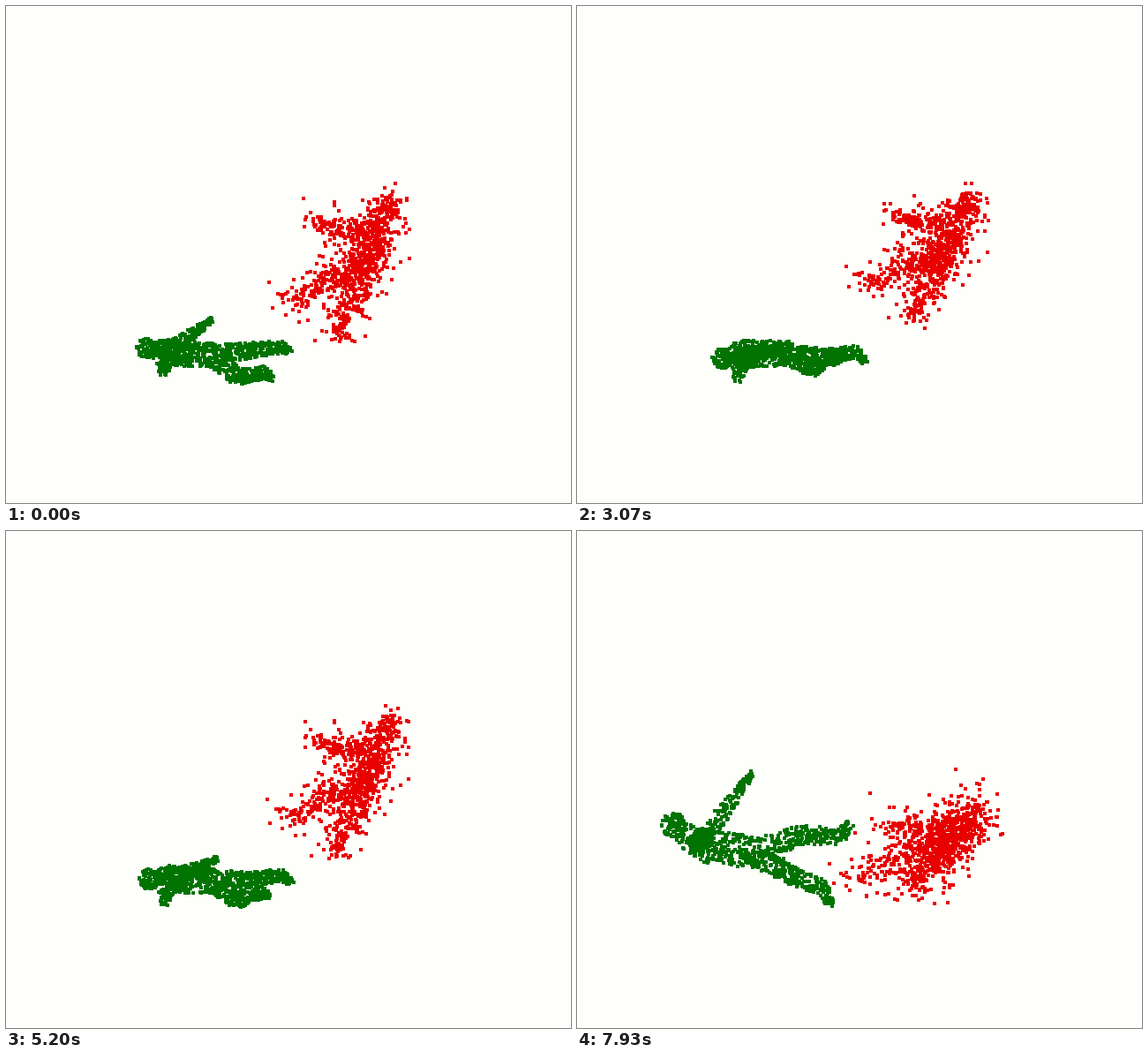
A matplotlib script for the animation above (8000 ms loop, 640 by 563 pixels).

```python
import numpy as np
import matplotlib.pyplot as plt
from matplotlib.animation import FuncAnimation

W, H, DPI = 640, 563, 64
LOOP, STEP = 8000, 40
TICK = 1000 / 15
PAPER, GREEN, RED = "#fefefb", "#007300", "#e80000"
PIVOT = np.array([300, 347])

# Spells in which the view turns; the picture rests in between.
SPELLS = [(0, 70), (270, 1130), (1270, 1400), (1730, 2730), (2930, 3200),
          (3400, 3730), (3870, 5800), (6070, 6270), (6600, 7400), (7470, 7930)]
UPDATES = np.concatenate([np.linspace(a, b, round((b - a) / TICK) + 1) for a, b in SPELLS])

# Orbiting camera: time, tilt, yaw (degrees), zoom, sideways pan
VIEW = np.array([
    (0, 30, 3, 1, 8), (500, 36, 3, 1, 6), (1270, 0, 0, 1, 0), (2300, 48, 3, 1, 6),
    (3070, 60, 5, 1, 14), (4000, 105, 5, 1, 16), (4600, 90, 5, 1, 16),
    (5800, -3, 10, 1, 1), (6270, -3, 11, 1.22, -5), (7330, -32, 13, 1.23, -5),
    (7930, -32, 0, 1.23, -5)])

# Joints in space around the pivot
WALKER = dict(
    head=(-151, 18, 50), chest=(-127, 31, 37), hip=(-76, 37, 32),
    hand1=(-78, -29, 66), hand2=(-132, 42, 63),
    knee1=(-35, 25, 44), foot1=(2, 23, 38), toe1=(12, 19, 55),
    knee2=(-46, 63, 38), foot2=(-14, 67, 20), toe2=(-7, 80, 12))
GHOST = dict(
    head=(125, -83, -93), chest=(112, -59, -77), hip=(101, -29, -57),
    hand1=(44, -66, -89), knee1=(60, -12, -56), foot1=(13, 14, -45),
    knee2=(90, 1, -41), foot2=(68, 43, -17))

# Bones: two joints, the radius at each, number of points
BONES = [("head", "head", 11, 11, 70), ("head", "chest", 6, 14, 60),
         ("chest", "hip", 16, 14, 220), ("chest", "hand1", 10, 3, 150),
         ("chest", "hand2", 13, 5, 90)]
for side in "12":
    BONES += [("hip", "knee" + side, 12, 9, 110), ("knee" + side, "foot" + side, 9, 7, 110),
              ("foot" + side, "toe" + side, 6, 4, 40)]


def cloud(joints, seed, spread=0):
    """Scatter points over the surface of a body, with optional noise."""
    rng = np.random.default_rng(seed)
    parts = []
    for start, end, r0, r1, n in BONES:
        if start not in joints or end not in joints:
            continue
        a, b = np.array(joints[start]), np.array(joints[end])
        u = rng.random((n, 1))
        out = rng.normal(size=(n, 3))
        out /= np.linalg.norm(out, axis=1, keepdims=True)
        parts.append(a + (b - a) * u + out * (r0 + (r1 - r0) * u))
    points = np.concatenate(parts)
    sigma = spread * np.where(rng.random((len(points), 1)) < 0.5, 1, 0.3)
    return points + sigma * rng.normal(size=points.shape)


def camera(t):
    keys = VIEW[:, 0]
    i = np.clip(np.searchsorted(keys, t, "right") - 1, 0, len(keys) - 2)
    s = (t - keys[i]) / (keys[i + 1] - keys[i])
    ease = s * s * (3 - 2 * s)
    return (VIEW[i] + (VIEW[i + 1] - VIEW[i]) * ease)[1:]


def project(points, tilt, yaw, zoom, pan):
    x, y, z = points.T
    tilt, yaw = np.radians((tilt, yaw))
    depth = z * np.cos(tilt) - y * np.sin(tilt)
    y = y * np.cos(tilt) + z * np.sin(tilt)
    x = x * np.cos(yaw) + depth * np.sin(yaw)
    return np.round((PIVOT[0] + pan + zoom * x, PIVOT[1] + zoom * y))


fig = plt.figure(figsize=(W / DPI, H / DPI), dpi=DPI, facecolor=PAPER)
ax = fig.add_axes((0, 0, 1, 1))
ax.set(xlim=(0, W), ylim=(H, 0))
ax.axis("off")


def dots(color):
    return ax.plot([], [], "s", ms=4 * 72 / DPI, mew=0, color=color, antialiased=False)[0]


layers = [(cloud(GHOST, seed=11, spread=12), dots(RED)),
          (cloud(WALKER, seed=4), dots(GREEN))]


def draw(i):
    now = (i + 1) * STEP - 1
    view = camera(UPDATES[UPDATES <= now][-1])
    for points, line in layers:
        line.set_data(*project(points, *view))
    return [line for _, line in layers]


anim = FuncAnimation(fig, draw, frames=LOOP // STEP, interval=STEP,
                     repeat=True, repeat_delay=0, blit=False)
plt.show()
```
